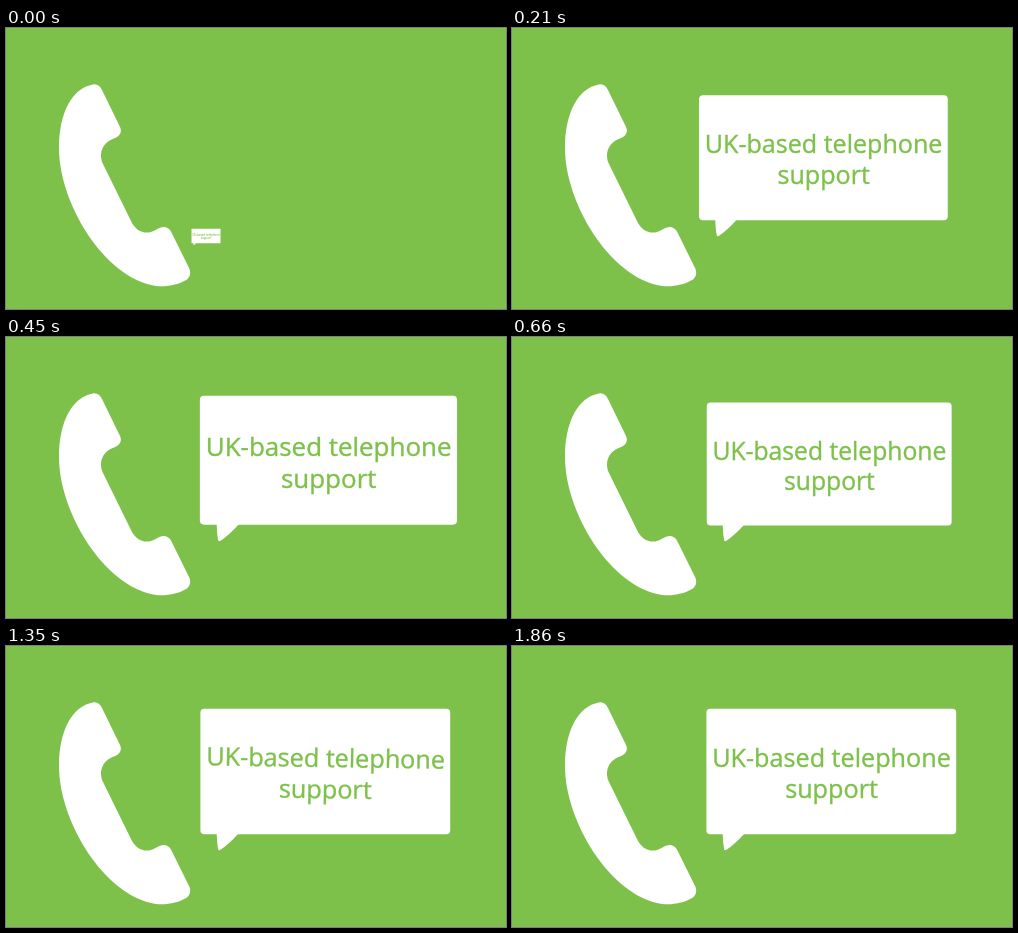
These frames come from a looping animation (500x281 px, 3480 ms). An HTML page:

```html
<!DOCTYPE html>
<html lang="en">
<head>
<meta charset="utf-8">
<title>Telephone support</title>
<style>
  html, body { margin: 0; width: 100%; height: 100%; overflow: hidden; background: #7dc14b; }
  svg { display: block; width: 100%; height: 100%; }
  .shape { fill: #fff; }
  text {
    font: 25.2px "Open Sans", "Noto Sans", sans-serif;
    fill: #7dc14b; stroke: #7dc14b; stroke-width: 0.4; text-anchor: middle;
  }
</style>
</head>
<body>
<svg viewBox="0 0 500 281">
  <path class="shape" d="M87 56.5 C91 55.8 94 58 96 62 L114 99 C116.3 104 114 108.3 108 110.5
    C97 114 92 125 97 136 L125 193 C130.3 204.8 141.5 207.5 150.5 201.5 C156 197.5 162 198 165 203.5
    L183.5 241 C185 245 184 249 181 251.5 C172 257 161 259 150 258
    C98 250 53 175 53 120 C53 85 66 60 87 56.5 Z"/>
  <g id="bubble">
    <rect class="shape" x="194.4" y="62.8" width="249.8" height="125.4" rx="4"/>
    <path class="shape" d="M210.7 187 Q211 198 212.2 203.2 Q212.6 205 214.5 203.8 Q222 199 233 187 Z"/>
    <g id="label">
      <text x="319.5" y="121">UK-based telephone</text>
      <text x="319.5" y="152.2">support</text>
    </g>
  </g>
</svg>
<script>
  const LOOP = 3480, STEP = 30;
  const TIP = { x: 212.4, y: 204 };
  const bubble = document.getElementById("bubble");
  const label = document.getElementById("label");

  const progress = (t, from, to) => Math.min(1, Math.max(0, (t - from) / (to - from)));
  const mix = (a, b, p) => a + (b - a) * p;
  const smooth = p => p * p * (3 - 2 * p);
  const easeOut = p => 1 - (1 - p) ** 3.13;

  // Pop open past full size, dip below it, then settle.
  function bubbleScale(t) {
    if (t < 345) return mix(0.116, 1.045, easeOut(progress(t, 0, 345)));
    if (t < 675) return mix(1.045, 0.98, smooth(progress(t, 345, 675)));
    return mix(0.98, 1, smooth(progress(t, 675, 975)));
  }

  function draw(now) {
    const t = Math.floor((now % LOOP) / STEP) * STEP;
    const travel = progress(t, 0, 300);
    const x = mix(187.6, TIP.x, travel);
    const y = mix(217.2, TIP.y, travel);
    const tilt = 2 * Math.sin(2 * Math.PI * progress(t, 1315, 1860));
    bubble.setAttribute("transform",
      `translate(${x} ${y}) scale(${bubbleScale(t)}) translate(${-TIP.x} ${-TIP.y})`);
    label.setAttribute("transform", `rotate(${tilt} 319.5 128)`);
  }

  const start = performance.now();
  function tick() {
    draw(performance.now() - start);
    requestAnimationFrame(tick);
  }
  tick();
</script>
</body>
</html>
```
